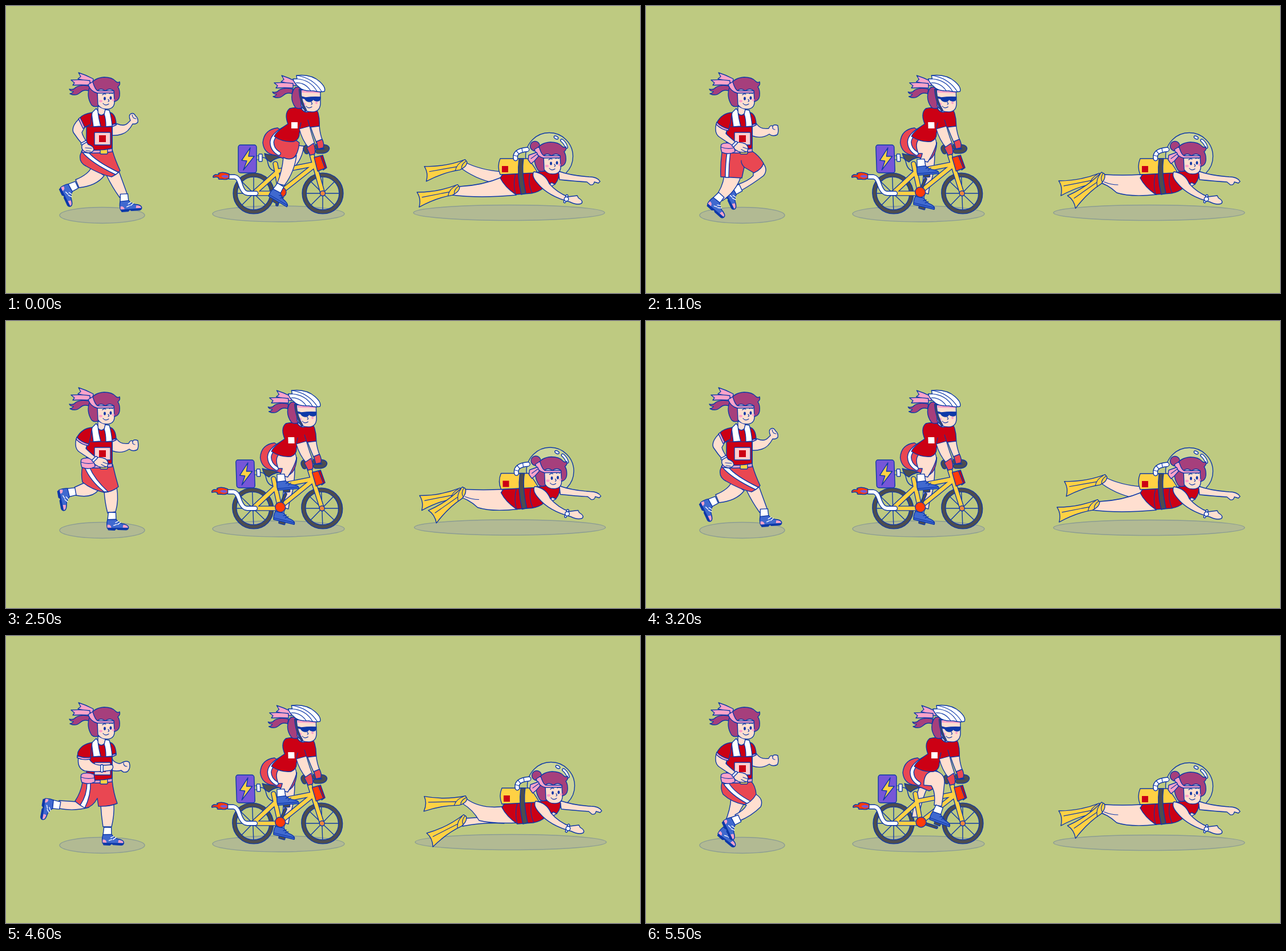
Write an HTML page that moves like this. It is 1111 by 504 pixels and loops after 5.6 s.

```html
<!DOCTYPE html>
<html lang="en">
<head>
<meta charset="utf-8">
<title>Run, ride, dive</title>
<style>
  html, body { margin: 0; width: 100%; height: 100%; overflow: hidden; background: #beca81; }
  svg { display: block; width: 100%; height: 100%; }
</style>
</head>
<body>
<svg id="stage" viewBox="0 0 1111 504" stroke="#0d38a8" stroke-width="1.4" stroke-linejoin="round" stroke-linecap="round" fill="none"></svg>
<script>
const STEP = 100, LOOP = 5600;
const LINE = '#0d38a8', RED = '#cc0014', CORAL = '#e94752', SKIN = '#ffdfd0', HAIR = '#a63f7c',
  PINK = '#ffa3c9', GOLD = '#ffd144', GREY = '#4d4d4f', ORANGE = '#ff3b0a', BLUE = '#4069cf',
  VIOLET = '#7656d8', WHITE = '#fff';

// Drawing helpers
const path = (d, fill = 'none', more = '') => `<path d="${d}" fill="${fill}" ${more}/>`;
const line = (d, w = 1.2) => path(d, 'none', `stroke-width="${w}"`);
const flat = (d, fill) => path(d, fill, 'stroke="none"');
const disc = (x, y, r, fill) => `<circle cx="${x}" cy="${y}" r="${r}" fill="${fill}"/>`;
const oval = (x, y, rx, ry, fill) => `<ellipse cx="${x}" cy="${y}" rx="${rx}" ry="${ry}" fill="${fill}" stroke="none"/>`;
const box = (x, y, w, h, r, fill, more = '') => `<rect x="${x}" y="${y}" width="${w}" height="${h}" rx="${r}" fill="${fill}" ${more}/>`;
const mark = (x, y, s, fill) => box(x, y, s, s, 0, fill, 'stroke="none"');
const tube = (d, w, fill) => path(d, 'none', `stroke-width="${w + 2.8}"`) + path(d, 'none', `stroke="${fill}" stroke-width="${w}"`);
const at = (x, y, s, turn = 0) => `<g transform="translate(${x} ${y}) rotate(${turn})">${s}</g>`;
const shadow = (x, y, rx, ry) =>
  `<ellipse cx="${x}" cy="${y}" rx="${rx}" ry="${ry}" fill="#b2ba93" stroke="#8b9c93"/>`;
const poses = (id, list) => `<g id="${id}">${list.map(s => `<g>${s}</g>`).join('')}</g>`;

// Shared parts
const sock = path('M-6 -13L7 -13L8 1L-7 1Z', WHITE);
const sole = path('M-7 13L29 12Q31 16 26 17L12 17L9 15L6 18L-5 18Z', LINE);
const upper = path('M-7 0L8 -1Q13 6 23 7Q31 9 30 14L-7 15Q-9 7 -7 0Z', BLUE);
const laces = path('M7 5L12 2M11 8L16 4M4 10L9 8', 'none', `stroke="${WHITE}"`);
const runShoe = (x, y, turn) => at(x, y, sock + sole + upper +
  flat('M-7 9Q-1 8 0 14L-7 14ZM21 8Q30 9 29 13L20 13Z', PINK) + laces, turn);
const bikeShoe = (x, y, turn) => at(x, y, box(3, 14, 11, 5, 1, GREY) + sock + upper + line('M-7 12L29 11M8 4L13 1M12 7L17 3'), turn);

const tails =
  path('M127 117Q140 121 153 128L152 135Q142 134 135 130L126 128L131 124Z', PINK) +
  path('M111 146Q118 148 122 143Q132 137 147 141L145 149Q136 146 130 152Q122 159 112 154Q117 153 118 150Q113 150 111 146Z', HAIR) +
  path('M114 130Q130 129 147 131L147 139Q130 138 117 139L120 135Z', PINK);
const eyes = oval(173, 162.5, 1.9, 2.9, LINE) + oval(183.5, 161.5, 1.9, 2.9, LINE) +
  line('M169 156Q172 153 175 155M181 154Q184 152 187 154');
const smile = oval(166, 167, 3, 2.2, PINK) + oval(188, 165, 2, 2.2, PINK) +
  line('M179 164Q182 167 179 168M170 171Q174 176 180 172');
const head =
  path('M150 174Q140 158 147 141Q153 126 172 125Q186 125 192 132Q196 136 199 133Q201 138 196 142Q200 148 199 158Q198 166 190 168L160 176Q154 178 150 174Z', HAIR) +
  path('M160 149Q166 143 174 149Q182 143 189 149L190 170Q189 181 176 181Q166 181 161 173Z', SKIN) +
  path('M144 138L152 133Q156 147 161 149L189 149L189 152.5L160 153Q148 150 144 138Z', PINK) + smile;

// Runner
const backLeg = path('M150 283Q144 296 122 305L128 319Q158 316 172 298Z', SKIN) + runShoe(112, 319, 65);
const frontLeg = path('M176 297L197 288L213 332L199 336Q186 318 176 297Z', SKIN) + runShoe(207, 343, -3);
const backStripe = path('M142 257Q142 280 130 297L138 302Q149 280 148 256Z', WHITE);
const backShorts = path('M134 257L186 253Q188 275 195 294Q180 300 162 299L160 285Q152 300 140 302Q128 297 121 290Q131 275 134 257Z', CORAL) + backStripe;
const legs = [
  backLeg + frontLeg +
    path('M133 254L186 252Q191 270 200 289Q194 296 185 300Q165 296 140 281Q128 275 130 262Z', CORAL) +
    path('M134 257Q150 276 192 296L197 292Q156 272 144 256Z', WHITE),
  path('M142 282L120 292L122 306Q150 312 162 297Z', SKIN) + runShoe(109, 301, 80) +
    path('M172 298L194 292Q198 315 192 335L178 337Q173 318 172 298Z', SKIN) + runShoe(185, 349, 2) +
    path('M134 255L187 252Q191 270 197 291Q187 300 172 301Q150 296 134 283Q131 270 134 255Z', CORAL) +
    path('M138 257Q147 280 172 300L179 300Q155 278 146 256Z', WHITE),
  path('M148 275L126 272L125 285L148 291Z', SKIN) + runShoe(127, 278, 97) +
    path('M166 297Q180 307 191 297Z', SKIN) +
    path('M148 297L167 300Q168 320 161 339L146 339Q143 318 148 297Z', SKIN) + runShoe(152, 350, 10) +
    path('M134 256L186 253Q189 275 193 290Q193 298 184 300L170 298L168 302L146 299Q133 296 133 285Z', CORAL) +
    path('M141 257Q143 278 148 299L154 300Q150 275 148 256Z', WHITE) + line('M166 272Q166 285 169 298'),
  path('M188 290L206 277Q214 288 206 298Q188 312 165 325L159 314Q180 307 188 298Z', SKIN) + runShoe(154, 324, 65) +
    path('M137 298L166 300Q158 325 134 342L121 335Q134 320 137 298Z', SKIN) + runShoe(123, 341, 42) +
    path('M133 257L183 253Q198 262 206 276Q203 287 189 293L172 283L168 302L131 300Q130 280 133 257Z', CORAL) +
    path('M142 257Q139 278 139 301L145 301Q145 278 148 256Z', WHITE) + line('M172 283Q166 276 167 271'),
  frontLeg + backLeg +
    path('M134 257L186 253Q195 270 203 288Q195 297 184 300L162 282Q155 295 145 302Q128 296 123 286Q132 270 134 257Z', CORAL) + backStripe,
  path('M167 297L190 295Q196 315 198 334L184 336Q173 315 167 297Z', SKIN) + runShoe(192, 349, 0) +
    path('M124 288L104 296L106 310Q130 312 147 301Z', SKIN) + runShoe(92, 308, 84) + backShorts,
  path('M166 297L189 295Q190 315 185 335L170 335Q167 315 166 297Z', SKIN) + runShoe(177, 349, 3) +
    path('M124 291L93 289L93 303Q120 308 145 301Z', SKIN) + runShoe(82, 295, 100) + backShorts,
  path('M149 284L172 294Q162 312 152 328L138 328Q148 305 149 284Z', SKIN) + runShoe(141, 340, 40) +
    path('M170 295L191 277Q207 286 201 300Q185 316 163 325L156 314Q172 306 176 297Z', SKIN) + runShoe(152, 325, 66) +
    path('M133 258L184 255Q192 263 193 278Q185 292 172 296Q150 292 135 278Q130 268 133 258Z', CORAL) +
    path('M136 260Q150 280 177 294L183 290Q155 275 145 258Z', WHITE),
];

const farArms = [
  path('M186 211L195 207Q207 212 213 206L218 201Q214 192 219 189Q224 187 227 193Q232 197 231 204Q228 208 222 207Q214 222 203 225Q193 228 186 227Z', SKIN) +
    line('M221 191Q222 198 228 198'),
  path('M186 210L194 207Q200 217 215 215Q218 208 222 211Q224 207 231 210Q233 222 230 226Q222 230 216 225Q202 234 186 228Z', SKIN) +
    line('M222 211Q221 217 226 217'),
  path('M185 213L188 219Q198 227 204 222Q212 218 216 222Q219 232 213 238Q206 241 202 236Q194 238 185 236Z', SKIN) +
    line('M206 223Q206 229 212 229'),
];
const pack = path('M132 243Q140 238 154 243L156 256Q145 262 133 257Q130 250 132 243Z', PINK) + line('M132 248Q143 252 155 249');
const sleeve = (d, trim) => path(d, RED) + path(trim, PINK);
const nearArms = [
  path('M128 198Q114 212 118 222Q126 234 134 243Q130 250 138 256Q148 261 154 253Q154 246 144 243Q134 228 133 222L138 213Z', SKIN) +
    tube('M133 242L140 238', 2, WHITE) + line('M139 249L150 250M140 254L148 255') +
    sleeve('M151 187Q134 190 129 197L136 214L148 208Z', 'M127 198L130 196L138 213L135 215Z'),
  pack + path('M123 207Q119 225 130 231Q140 238 152 245L156 252Q165 259 177 256Q182 248 174 242Q166 238 158 240Q146 230 140 224L143 214Z', SKIN) +
    tube('M153 245L158 240', 3, WHITE) + line('M170 248L178 251M167 252L175 256') +
    sleeve('M151 187Q133 188 124 205Q132 214 145 217L148 205Z', 'M124 204L123 208Q132 217 144 219L145 216Q132 213 124 204Z'),
  pack + path('M127 213Q124 232 138 237Q160 240 184 236Q190 231 186 226L172 227Q152 228 146 216Z', SKIN) +
    tube('M168 228L168 237', 3, WHITE) +
    sleeve('M151 187Q132 190 126 204L125 213Q135 217 148 215L149 203Z', 'M125 210L125 214Q136 219 148 216L148 213Q136 215 125 210Z'),
];
const swing = list => [list[0], list[1], list[2], list[1]];
const belt = path('M134 251Q160 256 186 250L186 256Q160 260 133 257Z', PINK) + box(165, 251, 13, 9, 2, GOLD);
const shirt =
  path('M148 188L183 187Q192 190 193 207L186 210L186 250Q165 255 141 252L141 210Z', RED) +
  line('M141 212L186 212L186 250') + path('M185 209L193 206L193 209L186 212Z', PINK) +
  box(155, 222, 28, 22, 1, '#ffcfcf') + mark(163, 227, 12, RED) +
  path('M161 176L161 188Q167 196 174 187L174 179Z', SKIN) +
  path('M158 180L150 188L153 212L166 211Q162 196 161 184Z', WHITE) +
  path('M174 182L181 183Q185 196 186 211L175 212Q175 198 172 190Z', WHITE);

const runner = shadow(168.5, 367.5, 74.5, 14) + poses('legs', legs) + belt +
  poses('farArm', swing(farArms)) + shirt + poses('nearArm', swing(nearArms)) + tails + head + eyes;

// Cyclist
const wheel = (x, y) => {
  let s = `<circle cx="${x}" cy="${y}" r="32.4" stroke-width="8.4"/><circle cx="${x}" cy="${y}" r="32.4" stroke="${GREY}" stroke-width="5.6"/>`;
  for (let a = 0; a < 180; a += 45) s += `<path d="M-28 0H28" transform="translate(${x} ${y}) rotate(${a})"/>`;
  return s;
};
const frame =
  tube('M434 329L481 329M434 329L475 292M472 277L481 327M481 327L543 278M476 290L538 278M535 258L555 329', 6.4, GOLD) +
  disc(434, 329, 3.5, GOLD) + disc(555, 329, 4.5, '#f08a3c');
const pipe = tube('M391 300L401 300Q407 301 410 311Q415 329 424 329L438 329', 6, WHITE) +
  path('M391 295Q380 290 372 294Q376 297 367 296Q362 298 363 301Q371 299 373 302Q370 305 379 304Q387 306 391 302Z', ORANGE) +
  flat('M389 298Q382 295 377 299Q382 303 389 301Z', VIOLET);
const battery = line('M450 266Q458 266 459 276Q462 290 474 290', 1.5) +
  box(407, 244, 32, 49, 4, VIOLET) + path('M428 249L413 271L422 272L416 288L435 264L425 264Z', GOLD) +
  line('M439 263H443M439 270H443') + box(443, 260, 6, 13, 1, WHITE);
const saddle = path('M453 259Q464 263 482 261L481 266Q470 268 464 274Q455 271 453 259Z', GREY);
const bars = tube('M527 256Q521 247 531 247L557 247Q565 248 562 252Q559 256 546 255', 6, GREY) +
  path('M549 264L555 262L562 284L556 288Z', RED) + path('M540 266L551 263L559 285L546 290Z', ORANGE);

const farThigh = path('M503 244L522 246Q519 268 506 282L494 268Z', SKIN);
const farCalf = path('M492 245L510 245Q510 290 499 315L496 330L484 327Q490 300 492 245Z', SKIN);
const farLegs = [
  farThigh, farThigh, farThigh,
  farCalf + bikeShoe(493, 329, 18),
  farCalf + bikeShoe(480, 336, 15),
  farCalf + bikeShoe(474, 328, 28),
  path('M480 262L494 264Q482 290 478 318L466 318Q470 290 480 262Z', SKIN),
];
const nearLegs = [
  ['M486 266Q500 273 509 262Q506 290 488 315L475 312Q484 290 486 266Z', 474, 325, 32],
  ['M486 264Q502 272 508 260Q503 290 476 310L464 305Q482 286 486 264Z', 464, 318, 38],
  ['M480 258Q490 240 510 244Q518 256 500 276Q488 290 474 298L464 290Q482 278 488 266Z', 463, 303, 28],
  ['M478 256Q480 234 500 232Q516 236 510 254Q500 270 486 286L473 281Q484 268 488 258Z', 474, 293, 10],
  ['M481 259Q472 235 493 228Q515 225 513 243Q508 258 497 274L483 271Q487 265 488 259Z', 485, 282, -3],
  ['M482 254Q486 234 505 234Q522 236 520 250Q518 272 514 286L501 285Q504 266 498 258Z', 505, 298, 8],
  ['M487 262Q486 238 505 237Q524 240 523 258Q521 280 518 299L505 297Q508 275 500 263Z', 509, 311, 22],
].map(([d, ...foot]) => path(d, SKIN) + bikeShoe(...foot));
const crank = poses('crank', [
  [475, 349], [460, 341], [456, 322], [474, 304], [492, 304], [505, 315], [509, 336],
].map(p => tube(`M481 327L${p}`, 3, GREY)));
const hips =
  path('M476 214Q452 217 450 240Q452 260 472 262L496 272Q512 266 514 240L500 230Z', CORAL) +
  tube('M490 214Q467 226 466 239Q466 252 478 259', 5, WHITE);
const jersey =
  path('M533 210L549 209Q550 225 555 237L545 242Q539 228 533 210Z', SKIN) +
  path('M544 238L554 234Q558 242 556 249L547 251Z', CORAL) +
  path('M497 180Q508 177 518 180Q526 188 534 181Q545 179 547 188Q550 200 549 211L532 213L514 222Q515 234 504 238Q486 240 470 229Q474 220 494 207Q487 188 497 180Z', RED) +
  path('M519 174L518 181Q525 190 533 184L532 176Z', SKIN) +
  flat('M514 216L532 211Q537 232 542 244L531 250Q519 236 514 216Z', SKIN) +
  line('M514 216L532 211Q537 232 542 244M531 250Q519 236 514 216L517 205M532 211L529 200') +
  path('M527 249L539 241Q543 252 541 260L533 262Z', CORAL) + mark(500, 204, 11, WHITE);
const riderHead =
  path('M507 178Q497 164 503 149Q507 138 518 145L520 178Q512 182 507 178Z', HAIR) +
  path('M517 147L551 148L551 172Q550 186 536 186Q523 186 517 175Z', SKIN) +
  flat('M518 148L550 149L550 153L518 152Z', PINK) + at(356, 5, smile) +
  path('M517 159L525 161Q538 159 551 160Q551 167 545 167Q540 167 538 163Q537 168 531 168Q525 167 524 163L517 161Z', LINE) +
  tube('M515 147Q516 168 525 183', 1.6, GREY) +
  path('M503 128L510 128L509 122Q535 119 550 133Q561 143 558 150Q550 152 538 149Q520 150 513 142Q505 136 503 128Z', WHITE) +
  line('M510 128Q534 130 545 150M509 122Q538 126 553 150M508 135Q524 134 534 149');
const cyclist = shadow(477.5, 365, 115.5, 14) + '<g id="rider">' +
  wheel(434, 329) + wheel(555, 329) + battery + poses('farLeg', farLegs) + saddle + frame + pipe + crank +
  disc(482, 327, 9, ORANGE) + bars + hips + poses('nearLeg', nearLegs) + jersey +
  at(356, 5, tails) + riderHead + '</g>';

// Diver
const fin = (x, y, turn) => at(x, y,
  path('M2 -5Q-35 -2 -70 -13Q-66 0 -74 13Q-40 6 -12 10Q2 8 4 0Z', GOLD) +
  line('M-20 9Q-14 -2 -2 -4M-8 9Q-8 2 3 -2M-16 3L-64 -2'), turn);
const kickMid = fin(794, 299, -17) +
  path('M803 296Q835 298 868 296L895 331Q850 336 825 328Q808 312 790 309Z', SKIN) +
  line('M803 309Q815 314 827 314') + fin(800, 297, -41);
const kicks = [
  path('M804 274Q830 288 870 291L868 313Q830 308 799 286Z', SKIN) + fin(804, 275, -16) +
    path('M868 301Q835 315 795 317L782 332Q830 338 894 332L896 308Z', SKIN) + fin(791, 319, -17),
  kickMid,
  path('M801 321Q830 320 880 314L870 330Q835 328 797 335Z', SKIN) + fin(800, 320, -33) +
    path('M804 287Q830 306 872 300L894 329Q850 331 826 325Q815 306 798 296Z', SKIN) + fin(801, 287, -7),
  kickMid,
];
const body =
  path('M968 290Q990 298 1022 300Q1036 300 1041 308L1038 311L1031 309Q1030 315 1024 314L1018 309Q1000 308 970 305Z', SKIN) +
  path('M866 268L914 268Q922 276 930 290L926 295L866 296Q860 282 866 268Z', GOLD) + mark(869, 281, 11, RED) +
  tube('M893 268Q890 254 913 252', 6, WHITE) + line('M889 262L897 264M894 254L899 260M904 250L905 256') +
  path('M870 296L926 293Q940 288 968 290Q971 302 962 313L950 311L942 319Q934 327 920 329L893 331Q874 318 866 302Z', RED) +
  path('M940 320Q952 320 962 313L956 310L952 314L947 312Z', SKIN) +
  path('M899 268L907 268Q903 292 911 329L903 331Q895 298 899 268Z', GREY) + line('M893 295Q888 312 893 331M918 294Q914 312 922 329');
const nearArm =
  path('M925 291Q920 299 932 312Q950 334 988 344Q1000 350 1008 347Q1013 343 1003 337L1001 333L985 335Q966 328 952 312Q945 294 925 291Z', SKIN) +
  tube('M979 344L983 333', 2, WHITE) + disc(982, 339, 3.8, WHITE);
const bubble =
  `<circle cx="952" cy="264" r="41.5" fill="#fff" fill-opacity=".2"/>` +
  `<ellipse cx="964" cy="231" rx="4" ry="2.3" fill="#fff" transform="rotate(28 964 231)"/>` +
  tube('M974 236Q980 241 982 248', 3, WHITE);
const bow = path('M930 257L916 262L915 270L920 277L926 272L933 264Z', PINK) + line('M931 260L920 268');
const diver = '<g id="diver">' + shadow(881.5, 363, 167.5, 13.5) + poses('kick', kicks) + bubble + body +
  disc(927, 246, 8.5, HAIR) + nearArm + at(782, 114, head + eyes) + bow + '</g>';

document.getElementById('stage').innerHTML = runner + cyclist + diver;

// Motion: running takes 8 steps, pedalling 7, kicking and arm swing 4
const $ = id => document.getElementById(id);
const show = (id, n) => [...$(id).children].forEach((g, k) => g.style.display = k === n ? '' : 'none');
const LEAN = [0, 0, 0.5, 1, 1, 0.5, 0];
const DRIFT = [0, 1.5, 3, 0];

function pose(n) {
  const turn = n % 7, beat = n % 4, lean = LEAN[turn];
  show('legs', n % 8);
  ['farArm', 'nearArm', 'kick'].forEach(id => show(id, beat));
  ['farLeg', 'crank', 'nearLeg'].forEach(id => show(id, turn));
  // The rider sways about the ground line
  $('rider').setAttribute('transform', `matrix(1 0 ${0.036 * lean} 1 ${-13.1 * lean} 0)`);
  $('diver').setAttribute('transform', `translate(${DRIFT[beat]} ${-DRIFT[beat] / 3})`);
}

const start = performance.now();
let last = -1;
function tick() {
  const n = Math.floor((performance.now() - start) % LOOP / STEP);
  if (n !== last) pose(last = n);
  requestAnimationFrame(tick);
}
tick();
</script>
</body>
</html>
```
